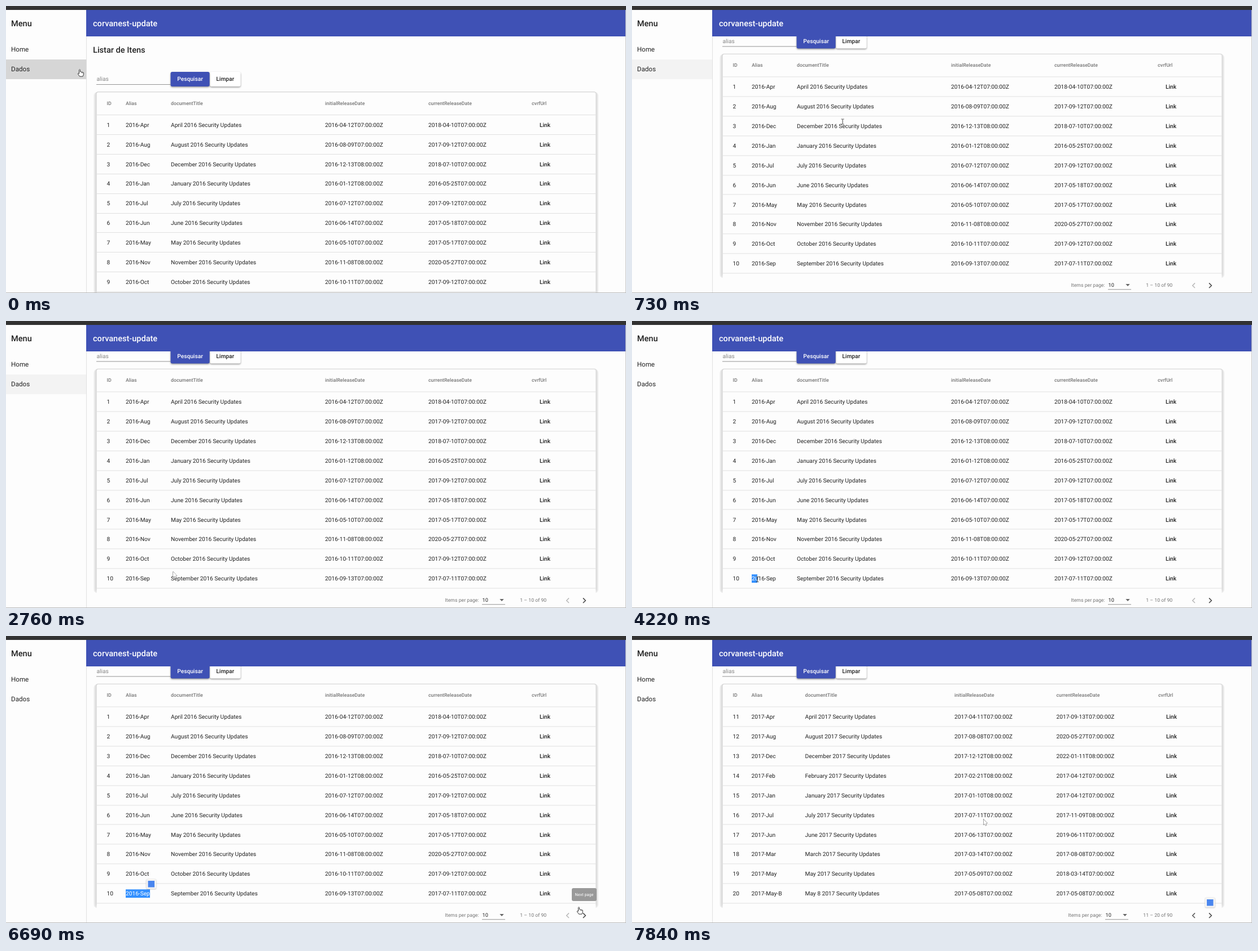
Write an HTML page with a canvas that moves like this. It is 1098 by 510 pixels and loops after 7.99 s.

```html
<!DOCTYPE html>
<html lang="pt">
<head>
<meta charset="utf-8">
<title>Listar de Itens</title>
<style>
  html, body { margin: 0; width: 100%; height: 100%; overflow: hidden; background: #fdfdfd; }
  canvas { display: block; }
</style>
</head>
<body>
<canvas id="stage" width="1098" height="510"></canvas>
<script>
const ctx = document.getElementById("stage").getContext("2d");
const LOOP = 7990;
const ROW = 34.91;
const BLUE = "#3f51b5", PAGE = "#fdfdfd", INK = "#222", MUTED = "#757575", RULE = "#e0e0e0";
const CELL = 10.18, SMALL = 8.73, TITLE = 14.55;

const MONTHS = ["January", "February", "March", "April", "May", "June", "July",
  "August", "September", "October", "November", "December"];

// Each row: alias month, first release, latest release
const pages = [
  {
    year: 2016, first: 1, cols: [178.5, 212, 292, 565, 748, 931, 945],
    pager: 0, range: "1 – 10 of 90",
    rows: ["Apr 04-12 2018-04-10", "Aug 08-09 2017-09-12", "Dec 12-13 2018-07-10",
      "Jan 01-12 2016-05-25", "Jul 07-12 2017-09-12", "Jun 06-14 2017-05-18",
      "May 05-10 2017-05-17", "Nov 11-08 2020-05-27", "Oct 10-11 2017-09-12",
      "Sep 09-13 2017-07-11"]
  },
  {
    year: 2017, first: 11, cols: [178.5, 211.5, 306.5, 571, 751.5, 932, 946],
    pager: -5, range: "11 – 20 of 90",
    rows: ["Apr 04-11 2017-09-13", "Aug 08-08 2020-05-27", "Dec 12-12 2022-01-11",
      "Feb 02-21 2017-04-12", "Jan 01-10 2017-04-12", "Jul 07-11 2017-11-09",
      "Jun 06-13 2019-06-11", "Mar 03-14 2017-08-08", "May 05-09 2018-03-14",
      "May-B 05-08 2017-05-08"]
  }
];
const HEADS = ["ID", "Alias", "documentTitle", "initialReleaseDate", "currentReleaseDate", "cvrfUrl"];

// Pointer path: time, shape, x, y
const pointer = [
  [0, hand, 130.5, 112], [120, arrow, 160, 128], [240, arrow, 230, 160],
  [360, beam, 330, 195], [490, beam, 373, 205.5], [1010, beam, 217.5, 174],
  [1160, arrow, 170, 150], [1290, arrow, 137.5, 133], [1440, arrow, 132.5, 126],
  [1560, arrow, 165, 130], [1680, arrow, 198, 143.5], [1830, arrow, 222, 180],
  [1950, arrow, 246.5, 225], [2100, beam, 247.5, 249], [2250, arrow, 225, 320],
  [2370, beam, 192, 420], [2490, beam, 179.5, 453], [2640, beam, 235, 453],
  [2760, arrow, 295.5, 445], [2910, beam, 371, 452], [3060, beam, 270, 456],
  [3180, beam, 180, 459], [3330, beam, 187, 462], [3450, beam, 200, 466],
  [3570, arrow, 205.5, 458], [3850, beam, 215, 458], [4220, beam, 222, 459],
  [4340, beam, 235, 461], [4460, beam, 248, 462], [4580, beam, 256, 463],
  [4700, arrow, 257.5, 456], [4850, arrow, 258, 456.5], [5000, arrow, 264, 455],
  [5120, arrow, 288, 452], [5240, arrow, 310.5, 444], [5360, arrow, 315.5, 436],
  [5480, beam, 294, 430.5], [5630, beam, 340, 400], [5750, beam, 395, 360],
  [5870, arrow, 430.5, 330], [6020, beam, 866.5, 344], [6170, beam, 868, 339],
  [6290, beam, 874, 352], [6420, arrow, 878, 359], [6570, arrow, 960, 425],
  [6690, hand, 1014.5, 481], [6820, hand, 1020, 490], [6940, hand, 1023.5, 495.5],
  [7090, hand, 1024, 496], [7720, arrow, 820, 420], [7840, arrow, 622, 325]
];

// Latest entry whose time has passed
function at(keys, t) {
  let hit = keys[0];
  for (const key of keys) if (key[0] <= t) hit = key;
  return hit;
}

function rect(x, y, w, h, color) {
  ctx.fillStyle = color;
  ctx.fillRect(x, y, w, h);
}

function round(x, y, w, h, r, color) {
  ctx.fillStyle = color;
  ctx.beginPath();
  ctx.roundRect(x, y, w, h, r);
  ctx.fill();
}

// y is the middle of the capitals
function text(str, x, y, size, color = INK, weight = 400, align = "left") {
  ctx.font = `${weight} ${size}px Roboto, sans-serif`;
  ctx.textAlign = align;
  ctx.fillStyle = color;
  ctx.fillText(str, x, y + size * 0.355);
}

function line(points, color, width, close) {
  ctx.beginPath();
  points.forEach(([x, y]) => ctx.lineTo(x, y));
  if (close) ctx.closePath();
  ctx.strokeStyle = color;
  ctx.lineWidth = width;
  ctx.stroke();
}

function withShadow(alpha, blur, dy, draw) {
  ctx.save();
  ctx.shadowColor = `rgba(0,0,0,${alpha})`;
  ctx.shadowBlur = blur;
  ctx.shadowOffsetY = dy;
  draw();
  ctx.restore();
}

function arrow() {
  line([[0.5, 0.5], [0.5, 10.5], [2.8, 8.5], [4.3, 12], [5.9, 11.3], [4.5, 7.9], [7.2, 7.6]],
    "#333", 0.9, true);
  ctx.fillStyle = "#fff";
  ctx.fill();
}

function beam() {
  line([[-2.5, -4.5], [-0.6, -4.5], [0, -4], [0.6, -4.5], [2.5, -4.5]], "#444", 0.9);
  line([[0, -4], [0, 4]], "#444", 1);
  line([[-2.5, 4.5], [-0.6, 4.5], [0, 4], [0.6, 4.5], [2.5, 4.5]], "#444", 0.9);
}

function hand() {
  ctx.beginPath();
  ctx.moveTo(-1, 8.2);
  ctx.lineTo(-1, 1.4);
  ctx.quadraticCurveTo(0, -0.4, 1, 1.4);
  ctx.lineTo(1, 5);
  ctx.quadraticCurveTo(2.3, 4, 3.2, 5.5);
  ctx.quadraticCurveTo(4.5, 4.6, 5.1, 6);
  ctx.quadraticCurveTo(6.8, 5.4, 6.9, 7.2);
  ctx.quadraticCurveTo(7, 10.5, 5.4, 13.2);
  ctx.lineTo(0, 13.2);
  ctx.lineTo(-3.2, 8.6);
  ctx.quadraticCurveTo(-3.2, 6.7, -1, 8.2);
  ctx.closePath();
  ctx.fillStyle = "#fff";
  ctx.fill();
  ctx.strokeStyle = "#333";
  ctx.lineWidth = 1;
  ctx.stroke();
  line([[3.2, 5.5], [3.2, 7.4]], "#333", 0.7);
  line([[5.1, 6], [5.1, 7.6]], "#333", 0.7);
}

function sidebar(t) {
  rect(0, 7, 142, 503, PAGE);
  rect(142, 54, 1, 456, RULE);
  const shade = at([[0, "#d6d6d6"], [120, "#e2e2e2"], [240, "#f3f3f3"], [4220, PAGE]], t)[1];
  rect(0, 95, 142, 35, shade);
  text("Menu", 9, 31, TITLE, INK, 500);
  text("Home", 9, 77.3, 11.63);
  text("Dados", 9, 112.3, 11.63);
}

function button(x, w, label, fill, color) {
  withShadow(0.4, 3, 1.5, () => round(x, 117, w, 26, 3, fill));
  text(label, x + w / 2, 129.7, CELL, color, 500, "center");
}

function searchForm() {
  text("Listar de Itens", 154, 77.5, TITLE, INK, 500);
  text("alias", 160.5, 129.7, CELL, "#858585");
  rect(160, 139, 131, 1, "#949494");
  button(361, 54.5, "Limpar", "#fff", INK);
  button(291.5, 69, "Pesquisar", BLUE, "#fff");
}

function stamp(date) {
  const winter = ["11", "12", "01", "02"].includes(date.slice(5, 7));
  return `${date}T0${winter ? 8 : 7}:00:00Z`;
}

function table(page, selectTo) {
  const c = page.cols;
  round(155.5, 152.5, 893.5, 399, 7, "#ececec");
  round(157.5, 152.5, 889.5, 398, 6, "#e0e0e0");
  round(159.5, 152.3, 885.8, 395, 4, "#cfcfcf");
  round(160.5, 153.3, 884, 400, [3, 3, 0, 0], PAGE);
  HEADS.forEach((head, i) => text(head, c[i], 172.9, SMALL, MUTED, 500));
  rect(160.5, 193, 884, 1, RULE);

  page.rows.forEach((row, i) => {
    const [tag, start, latest] = row.split(" ");
    const y = 211.1 + i * ROW;
    const alias = `${page.year}-${tag}`;
    const month = MONTHS.find(name => name.startsWith(tag.slice(0, 3)));
    const day = tag.endsWith("-B") ? " 8" : "";
    text(page.first + i, c[0], y, CELL);
    text(alias, c[1], y, CELL);
    text(`${month}${day} ${page.year} Security Updates`, c[2], y, CELL);
    text(stamp(`${page.year}-${start}`), c[3], y, CELL);
    text(stamp(latest), c[4], y, CELL);
    text("Link", c[6], y, CELL, INK, 500);
    rect(160.5, Math.round(193 + (i + 1) * ROW), 884, 1, RULE);
    if (i === 9 && selectTo > c[1]) {
      ctx.save();
      ctx.beginPath();
      ctx.rect(c[1], y - 7.5, selectTo - c[1], 15);
      ctx.clip();
      rect(c[1], y - 8, 50, 16, "#3390ff");
      text(alias, c[1], y, CELL, "#fff");
      ctx.restore();
    }
  });
}

function chevron(x, y, dir, color) {
  line([[x - 2 * dir, y - 4.3], [x + 2.3 * dir, y], [x - 2 * dir, y + 4.3]], color, 1.5);
}

function paginator(page) {
  const y = 563.3, dx = page.pager;
  text("Items per page:", 777.5 + dx, y, SMALL, MUTED);
  text("10", 843.5 + dx, y, 9.2, INK);
  rect(843 + dx, y + 7.5, 41, 1, "#949494");
  ctx.beginPath();
  ctx.moveTo(874.3 + dx, y - 1.6);
  ctx.lineTo(881.7 + dx, y - 1.6);
  ctx.lineTo(878 + dx, y + 2.2);
  ctx.fillStyle = "#666";
  ctx.fill();
  text(page.range, 910.3 + dx, y, SMALL, MUTED);
  chevron(995, y + 1, -1, page.first > 1 ? "#555" : "#b8b8b8");
  chevron(1024, y + 1, 1, "#444");
}

function badge(x, y) {
  withShadow(0.3, 2, 0.5, () => round(x, y, 17.5, 17.5, 2, "#f4f4f4"));
  rect(x + 3, y + 3, 11.5, 11.5, "#4a86ee");
}

function tooltip(color) {
  round(1002, 448, 44, 23, 3, color);
  text("Next page", 1024, 459.8, 7.27, "#fff", 400, "center");
}

function draw(t) {
  const page = pages[t < 7600 ? 0 : 1];
  const scroll = at([[0, 0], [610, 26.2], [730, 67.6]], t)[1];
  const selectTo = at([[0, 0], [4220, 222], [4340, 235], [4460, 248], [4580, 255], [7600, 0]], t)[1];

  rect(0, 0, 1098, 510, PAGE);
  ctx.save();
  ctx.beginPath();
  ctx.rect(143, 54, 954, 455);
  ctx.clip();
  ctx.translate(0, -scroll);
  searchForm();
  table(page, selectTo);
  paginator(page);
  ctx.restore();

  sidebar(t);
  rect(142, 7, 955, 47, BLUE);
  text("corvanest-update", 154, 31, TITLE, "#fff", 500);
  rect(0, 0, 1098, 7, "#323232");
  rect(1097, 7, 1, 503, "#c8c8c8");
  rect(0, 509, 1098, 1, "#b8b8b8");

  if (t >= 6690 && t < 7600) tooltip(t < 6820 ? "#999" : "#727272");
  if (t >= 7460) badge(1015, 465);
  else if (t >= 5120) badge(248.5, 432);

  const [, shape, x, y] = at(pointer, t);
  ctx.save();
  ctx.translate(x, y);
  shape();
  ctx.restore();
}

ctx.textRendering = "geometricPrecision";
const begin = performance.now();
function tick() {
  draw((performance.now() - begin) % LOOP);
  requestAnimationFrame(tick);
}
tick();
</script>
</body>
</html>
```
